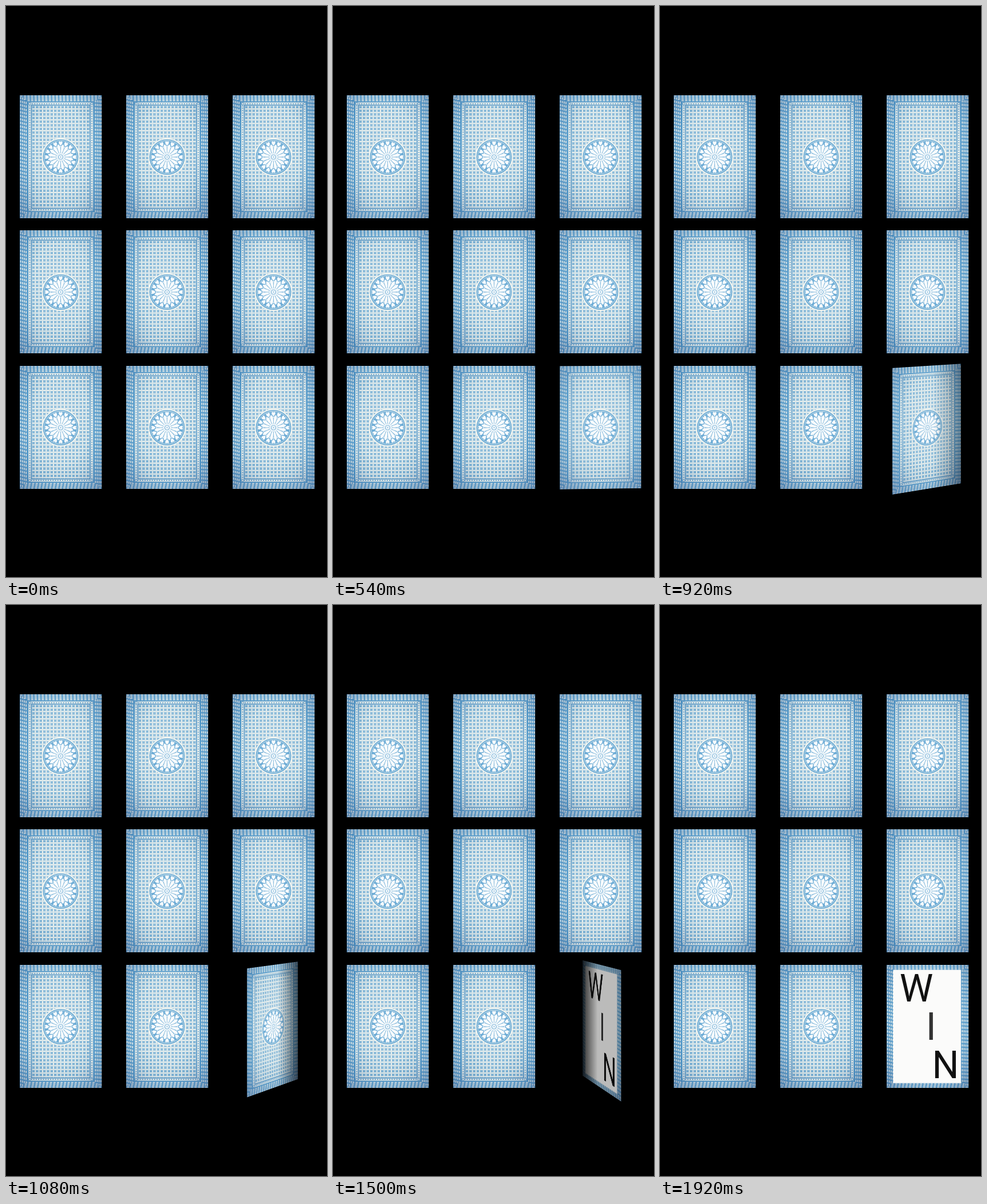
Animation, 561 px wide and 998 px high, one loop 1.96 s. Source, as an HTML page:

```html
<!DOCTYPE html>
<html lang="en">
<head>
<meta charset="utf-8">
<title>Card flip</title>
<style>
html, body { margin: 0; width: 100%; height: 100%; overflow: hidden; background: #000; }
#stage { position: relative; width: 561px; height: 998px; overflow: hidden;
  perspective: 1050px; perspective-origin: 280.5px 499px; }
.card { position: absolute; width: 143.5px; height: 215px; }
#flip { transform-style: preserve-3d; }
.side { position: absolute; inset: 0; backface-visibility: hidden; }
.front { transform: rotateY(180deg); }
.side::after { content: ""; position: absolute; inset: 0;
  background: linear-gradient(to right, rgba(0,0,0,var(--dim)) 58%, rgba(0,0,0,var(--far))); }
.front::after { background: linear-gradient(to left, rgba(0,0,0,var(--dim)) 58%, rgba(0,0,0,var(--far))); }
svg { display: block; width: 100%; height: 100%; }
#defs { position: absolute; width: 0; height: 0; }
text { font: 66px Roboto, Lato, sans-serif; text-anchor: middle; fill: #111; }
</style>
</head>
<body>
<svg id="defs"></svg>
<div id="stage"></div>
<script>
const W = 143.5, H = 215, BLUE = '#5a9fcd', CREAM = '#f3f5ee';
const FRAME = 1000 / 24, LOOP = 1960;

const rect = (x, y, attrs) =>
  `<rect x="${x}" y="${y}" width="${W - 2 * x}" height="${H - 2 * y}" ${attrs}/>`;
const ring = (x, y, width, color, dash = '', shift = 0) =>
  rect(x, y, `fill="none" stroke="${color}" stroke-width="${width}" stroke-dasharray="${dash}"
    stroke-dashoffset="${shift}" ${dash && 'stroke-linecap="round"'}`);
const around = (count, shape, turn = 0) => Array.from({ length: count }, (_, i) =>
  `<g transform="rotate(${(i + turn) * 360 / count})">${shape}</g>`).join('');

const border = [[1.6, 1.3], [4.8, 4], [8, 6.7], [11.2, 9.4]].map(([x, y], i) =>
  ring(x, y, 1.7, CREAM, '2.6 3.6', i * 3.1)).join('');

const medallion = `<g transform="translate(71.5 108)">
  <circle r="33" fill="${CREAM}"/>
  <circle r="31" fill="#4f9bcd"/>
  <circle r="28.8" fill="none" stroke="${CREAM}" stroke-width=".7"/>
  <g fill="#f8fbfc">
    ${around(16, '<path d="M0-20C-4.6-24-3.6-28-1.2-27.4L0-26.3L1.2-27.4C3.6-28 4.6-24 0-20Z"/>')}
    ${around(16, '<path d="M0-5L-1.5-9L-2.7-17Q-2.5-21 0-22.5Q2.5-21 2.7-17L1.5-9Z"/>', .5)}
    ${around(16, '<circle cy="-18.5" r=".9"/>')}
    <circle r="8"/>
  </g>
  ${around(16, '<path d="M0-6V-10" stroke="#4f9bcd" stroke-width=".7"/>')}
  <circle r="4" fill="none" stroke="#4f9bcd" stroke-width="1.2"/>
  <circle r="1.4" fill="#8dbfe0"/>
</g>`;

const corners = [[17.5, 14.8], [W - 17.5, 14.8], [17.5, H - 14.8], [W - 17.5, H - 14.8]]
  .map(([x, y]) => `<circle cx="${x}" cy="${y}" r="2" fill="${CREAM}" stroke="${BLUE}"/>`).join('');

defs.innerHTML = `<defs>
  <pattern id="lattice" x="20.9" y="17.6" width="6.35" height="6.35" patternUnits="userSpaceOnUse">
    <rect width="6.35" height="6.35" fill="${CREAM}"/>
    <path d="M.4.4Q3.2 2.3 6 .4Q4.1 3.2 6 6Q3.2 4.1.4 6Q2.3 3.2.4.4Z" fill="${BLUE}"/>
    <circle cx="3.2" cy="3.2" r=".6" fill="${CREAM}"/>
  </pattern>
  <radialGradient id="light" cx=".5" cy=".45" r=".72">
    <stop stop-color="#fff" stop-opacity=".28"/>
    <stop offset=".5" stop-color="#e8f0f8" stop-opacity=".1"/>
    <stop offset=".65" stop-color="#31588c" stop-opacity=".06"/>
    <stop offset="1" stop-color="#203c70" stop-opacity=".34"/>
  </radialGradient>
  <symbol id="back" viewBox="0 0 ${W} ${H}">
    ${rect(0, 0, `fill="${BLUE}"`)}
    ${border}
    ${ring(17.5, 14.8, 4.4, CREAM)}
    ${ring(17.5, 14.8, 1.7, BLUE, '.8 3.4')}
    ${rect(20.5, 17.3, `fill="url(#lattice)" stroke="#4f93c4" stroke-width="1.5"`)}
    ${corners}
    ${medallion}
    ${rect(0, 0, 'fill="url(#light)"')}
  </symbol>
</defs>`;

const back = '<svg><use href="#back"/></svg>';
const face = `<svg viewBox="0 0 ${W} ${H}"><use href="#back"/>
  <rect x="11.5" y="8.7" width="118.5" height="198" fill="#fbfbfa"/>
  <text x="52" y="63.5">W</text>
  <text x="77.7" y="130.5" style="fill:#333">I</text>
  <text x="103" y="197.5">N</text></svg>`;

for (let i = 0; i < 9; i++) {
  const pos = `left:${24 + i % 3 * 186.2}px;top:${155.5 + (i / 3 | 0) * 236.5}px`;
  stage.innerHTML += i < 8
    ? `<div class="card" style="${pos}">${back}</div>`
    : `<div class="card" id="flip" style="${pos}">
        <div class="side">${back}</div><div class="side front">${face}</div></div>`;
}
const flip = document.getElementById('flip');

// Accelerates from rest, then eases slightly into the final pose.
function angle(t) {
  if (t < 380) return 0;
  if (t < 1630) return (0.00925 * (t - 380)) ** 2;
  return 180 - 46.3 * Math.max(0, 1 - (t - 1630) / 270) ** 1.3;
}

function draw(now) {
  const t = Math.floor((now % LOOP + 3.4) / FRAME) * FRAME;
  const a = angle(t), tilt = Math.sin(a * Math.PI / 180);
  flip.style.transform = `rotateY(${a}deg)`;
  flip.style.setProperty('--dim', Math.max(0, tilt - 0.7));
  flip.style.setProperty('--far', Math.max(0, tilt - 0.1) * 0.95);
  requestAnimationFrame(() => draw(performance.now() - start));
}
const start = performance.now();
draw(0);
</script>
</body>
</html>
```
